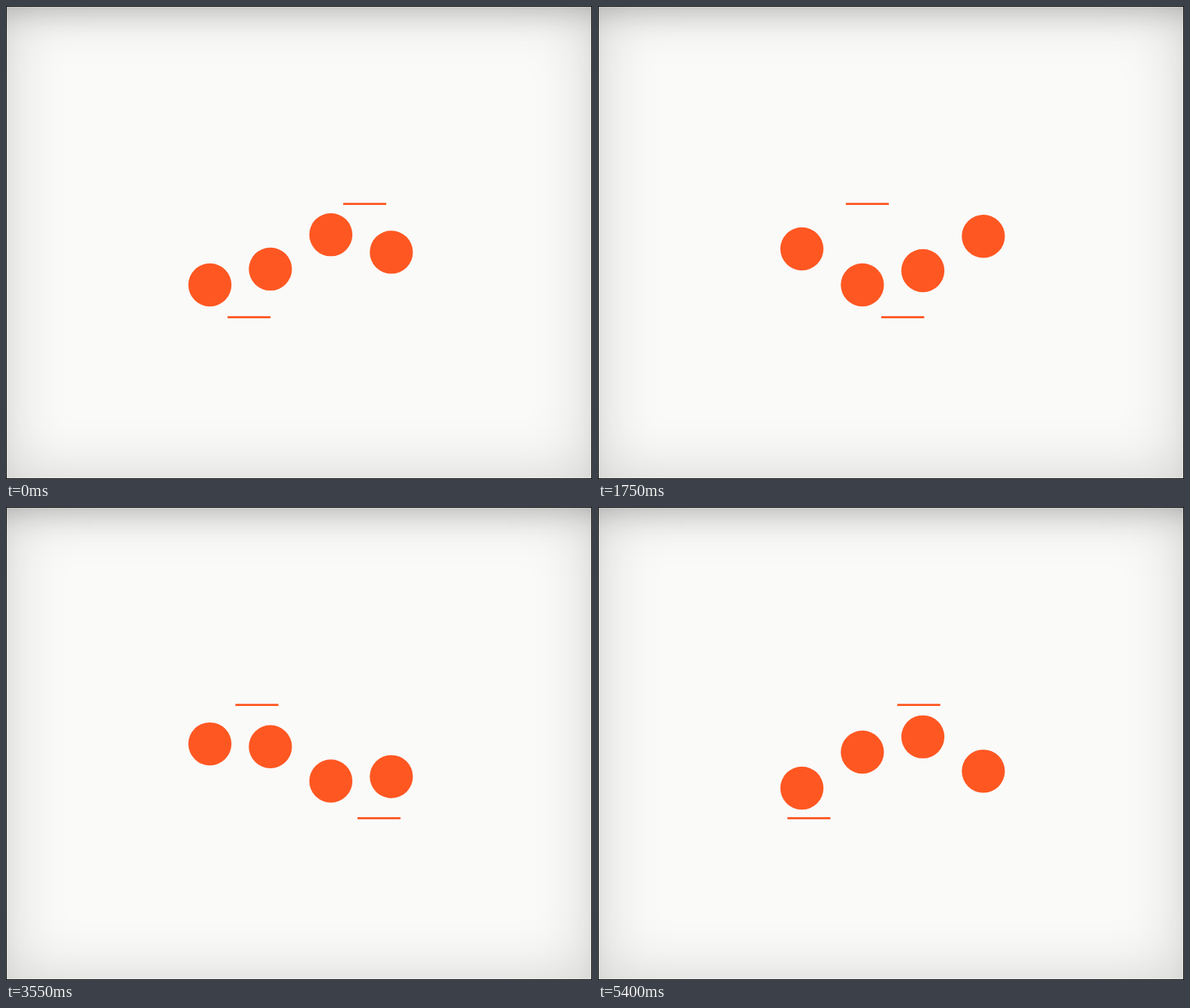
Animation of 780 by 630 pixels, one loop 5450 ms. Source, as an HTML page:

```html
<!DOCTYPE html>
<html lang="en">
<head>
<meta charset="utf-8">
<title>Juggling balls</title>
<style>
  html, body { margin: 0; width: 100%; height: 100%; overflow: hidden; }
  .stage {
    box-sizing: border-box;
    width: 780px;
    height: 630px;
    border: 1px solid #111;
    background: #fafaf9;
    box-shadow:
      inset 0 0 80px rgba(0, 0, 0, .16),
      inset 0 30px 44px -30px rgba(0, 0, 0, .26);
  }
  svg { position: absolute; left: 0; top: 0; fill: #ff5722; }
</style>
</head>
<body>
<div class="stage"></div>
<svg width="780" height="630" viewBox="0 0 780 630">
  <rect class="bar" y="262.2" width="57.3" height="2.8"/>
  <rect class="bar" y="413.1" width="57.3" height="2.8"/>
  <circle class="ball" r="28.7"/>
  <circle class="ball" r="28.7"/>
  <circle class="ball" r="28.7"/>
  <circle class="ball" r="28.7"/>
</svg>
<script>
  const LOOP = 5450, STEP = 50, PERIOD = 1400, TICK = 1000 / 60;
  const LEFT = 242.7, GAP = 80.5, RADIUS = 28.7;
  const TOP_Y = 293.4, TRAVEL = 91.5;

  // Phase at which each ball touches the floor
  const landings = [1297, 264, 614, 964];
  // Phase at which the top and bottom bars leave each ball
  const departures = [[616, 980, 1330, 276], [1300, 264, 614, 962]];

  const balls = [...document.querySelectorAll('.ball')];
  const bars = [...document.querySelectorAll('.bar')];
  const wrap = t => ((t % PERIOD) + PERIOD) % PERIOD;
  const slot = i => LEFT + i * GAP;

  balls.forEach((ball, i) => ball.setAttribute('cx', slot(i) + RADIUS));

  // cubic-bezier(0, .5, .5, 1)
  function ease(p) {
    let lo = 0, hi = 1;
    for (let i = 0; i < 20; i++) {
      const s = (lo + hi) / 2;
      if (1.5 * s * s - 0.5 * s ** 3 < p) lo = s; else hi = s;
    }
    return 1.5 * lo - 0.5 * lo ** 3;
  }

  function ballY(phase, landing) {
    const u = wrap(phase - landing) / PERIOD;
    return TOP_Y + TRAVEL * Math.abs(1 - 2 * u);
  }

  function barX(phase, starts) {
    const ages = starts.map(start => wrap(phase - start));
    const from = ages.indexOf(Math.min(...ages));
    const to = (from + 1) % starts.length;
    const p = ages[from] / wrap(starts[to] - starts[from]);
    return slot(from) + (slot(to) - slot(from)) * ease(p);
  }

  function draw(now) {
    const t = Math.floor((now % LOOP) / STEP) * STEP;
    // The motion skips ahead by one tick early in the loop
    const phase = wrap(t + (t > 1200 ? TICK : 0));
    balls.forEach((ball, i) => ball.setAttribute('cy', ballY(phase, landings[i])));
    bars.forEach((bar, i) => bar.setAttribute('x', barX(phase, departures[i])));
  }

  const start = performance.now();
  function tick() {
    draw(performance.now() - start);
    requestAnimationFrame(tick);
  }
  tick();
</script>
</body>
</html>
```
